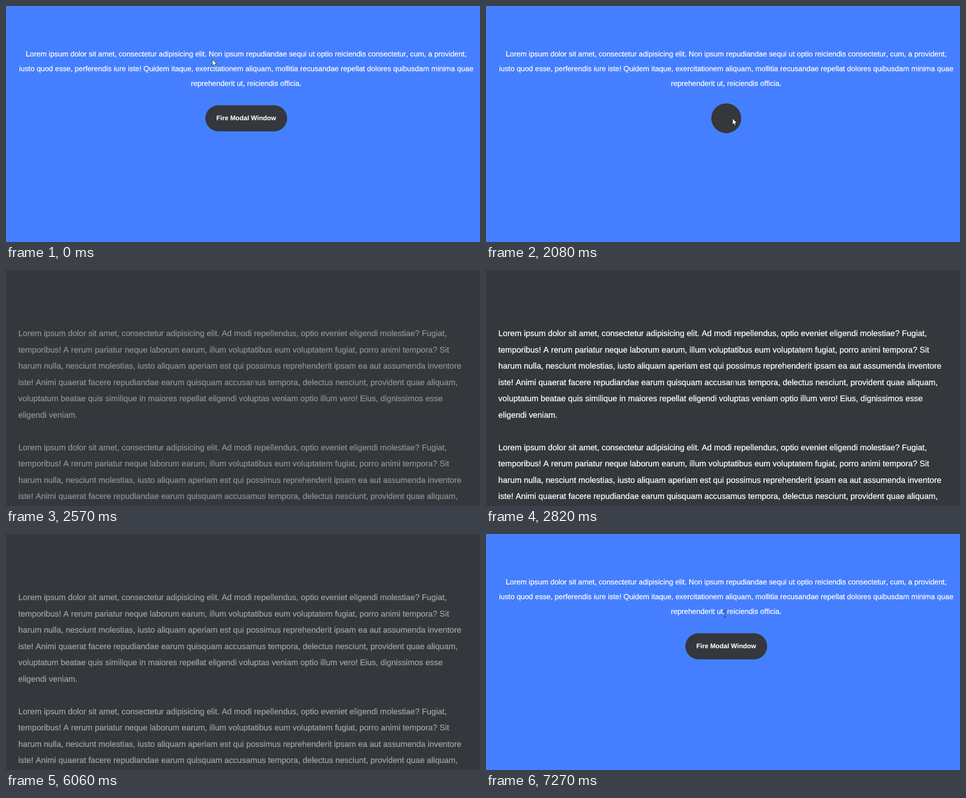
These frames come from a looping animation (1058 px wide and 529 px high, 7700 ms). An HTML page:

```html
<!DOCTYPE html>
<html lang="en">
<head>
<meta charset="utf-8">
<title>Morphing modal window</title>
<style>
  html, body { margin: 0; width: 100%; height: 100%; overflow: hidden; background: #457fff; }
  svg { display: block; width: 100%; height: 100%; }
  text {
    font-family: "Liberation Sans", Arial, sans-serif; font-kerning: none;
    fill: #fff; stroke: #fff; stroke-width: .3; text-rendering: geometricPrecision;
  }
  #intro { font-size: 16.44px; text-anchor: middle; }
  #modal { font-size: 18.27px; }
  #label { font-size: 14.65px; font-weight: bold; text-anchor: middle; stroke-width: .1; }
  .dark { fill: #34383c; }
  .pointer { fill: #fff; stroke: #111; stroke-width: .9; stroke-linejoin: round; }
  .beam { fill: none; stroke: #2b3340; stroke-width: 1.2; }
</style>
</head>
<body>
<svg viewBox="0 0 1058 529">
  <rect width="1058" height="529" fill="#457fff"/>
  <g id="intro"></g>
  <rect id="button" class="dark" y="222.5" height="58.4" rx="29.2"/>
  <text id="label" x="536.2" y="256.2">Fire Modal Window</text>
  <circle id="layer" class="dark" cx="536.3" cy="251.7"/>
  <g id="modal"></g>
  <g id="cursor">
    <path id="arrow" class="pointer" d="M.5.5V15L3.7 11.9 6 16.8 8.2 15.9 6 11H10.4Z"/>
    <path id="hand" class="pointer" d="M-1.6 1.2Q0-1 1.6 1.2V7Q3.2 6 4.4 7.6 6 6.8 7 8.4 9 7.8 9 10V14Q9 17 7.3 19.5H-1Q-2.6 17-5 13-6 10.5-3.6 11L-1.6 12.6Z"/>
    <path id="beam" class="beam" d="M-3-7.5H3M0-7.5V7.5M-3 7.5H3"/>
  </g>
</svg>
<script>
const LOOP = 7700, CX = 536.3, SMALL = 29.2, BIG = 905, WIDE = 182.6;
const $ = id => document.getElementById(id);

const intro = [
  "Lorem ipsum dolor sit amet, consectetur adipisicing elit. Non ipsum repudiandae sequi ut optio reiciendis consectetur, cum, a provident,",
  "iusto quod esse, perferendis iure iste! Quidem itaque, exercitationem aliquam, mollitia recusandae repellat dolores quibusdam minima quae",
  "reprehenderit ut, reiciendis officia."
];
const paragraph = [
  "Lorem ipsum dolor sit amet, consectetur adipisicing elit. Ad modi repellendus, optio eveniet eligendi molestiae? Fugiat,",
  "temporibus! A rerum pariatur neque laborum earum, illum voluptatibus eum voluptatem fugiat, porro animi tempora? Sit",
  "harum nulla, nesciunt molestias, iusto aliquam aperiam est qui possimus reprehenderit ipsam ea aut assumenda inventore",
  "iste! Animi quaerat facere repudiandae earum quisquam accusamus tempora, delectus nesciunt, provident quae aliquam,",
  "voluptatum beatae quis similique in maiores repellat eligendi voluptas veniam optio illum vero! Eius, dignissimos esse",
  "eligendi veniam."
];

function addLines(id, lines, x, y, pitch) {
  lines.forEach((line, i) => {
    const el = document.createElementNS("http://www.w3.org/2000/svg", "text");
    el.setAttribute("x", x);
    el.setAttribute("y", y + i * pitch);
    el.textContent = line;
    $(id).append(el);
  });
}
addLines("intro", intro, 536.2, 112.9, 32.9);
addLines("modal", [...paragraph, "", ...paragraph.slice(0, 4)], 27.6, 148.3, 36.5);

// Bursts of motion: start, end, number of intervals; the picture rests in between.
const bursts = [
  [30, 640, 11], [1550, 2200, 11], [2200, 2270, 1], [2440, 2820, 5],
  [4920, 5130, 4], [6060, 6620, 9], [6620, 6690, 1], [6690, 6800, 2], [6850, 7270, 8]
];
function snap(t) {
  const burst = bursts.filter(b => b[0] <= t).pop();
  if (!burst) return 0;
  const [start, end, n] = burst, step = (end - start) / n;
  return start + step * Math.min(n, Math.floor((t - start) / step + 1e-6));
}

// Cursor stops: time, x, y, shape until the next stop.
const stops = [
  [0, 460, 119, "arrow"], [30, 458, 128, "beam"], [90, 457, 136, "beam"],
  [250, 478, 170, "beam"], [340, 498, 194, "arrow"], [440, 522, 225, "hand"],
  [640, 559.6, 255, "hand"], [1900, 559.6, 255, "hand"], [1990, 552, 252, "arrow"],
  [2150, 541, 248, "arrow"], [2200, 541, 248, "arrow"], [2270, 553, 257, "arrow"],
  [2440, 554, 257, "beam"], [4900, 554, 257, "beam"], [5060, 1000, 172, "arrow"],
  [5077, 1036, 160, "arrow"], [5120, 1070, 140, ""], [6390, 1060, 80, "arrow"],
  [6620, 636, 186, "arrow"], [6740, 552, 181, "beam"], [6800, 533, 179, "beam"],
  [LOOP, 533, 179, "beam"]
];
function cursorAt(t) {
  const i = Math.max(1, stops.findIndex(s => s[0] > t));
  const [t0, x0, y0, shape] = stops[i - 1], [t1, x1, y1] = stops[i];
  const p = (t - t0) / (t1 - t0);
  return [x0 + (x1 - x0) * p, y0 + (y1 - y0) * p, shape];
}

const span = (t, start, length) => Math.min(1, Math.max(0, (t - start) / length));
const swing = p => .5 - Math.cos(p * Math.PI) / 2;
// CSS "ease", cubic-bezier(.25, .1, .25, 1)
function ease(p) {
  const bezier = (u, a, b) => 3 * a * u * (1 - u) ** 2 + 3 * b * u * u * (1 - u) + u ** 3;
  let low = 0, high = 1;
  for (let i = 0; i < 20; i++) {
    const mid = (low + high) / 2;
    if (bezier(mid, .25, .25) < p) low = mid; else high = mid;
  }
  return bezier(high, .1, 1);
}
// Rises to 1 and later falls back to 0.
const pulse = (t, curve, up, upLength, down, downLength) =>
  curve(span(t, up, upLength)) - curve(span(t, down, downLength));

function draw(time) {
  const t = snap(time % LOOP);

  const width = WIDE - (WIDE - 2 * SMALL) * pulse(t, ease, 1705, 300, 6790, 300);
  $("button").setAttribute("x", CX - width / 2);
  $("button").setAttribute("width", width);
  $("label").style.opacity = 1 - pulse(t, ease, 1517, 200, 7070, 200);

  const grown = pulse(t, swing, 2005, 400, 6400, 400);
  $("layer").setAttribute("r", grown > 0 ? SMALL + (BIG - SMALL) * grown : 0);
  $("modal").style.opacity = pulse(t, ease, 2410, 400, 5948, 400);

  const [x, y, shape] = cursorAt(t);
  $("cursor").setAttribute("transform", `translate(${x} ${y})`);
  for (const id of ["arrow", "hand", "beam"])
    $(id).style.display = id === shape ? "" : "none";
}

function tick() {
  draw(performance.now());
  requestAnimationFrame(tick);
}
tick();
</script>
</body>
</html>
```
